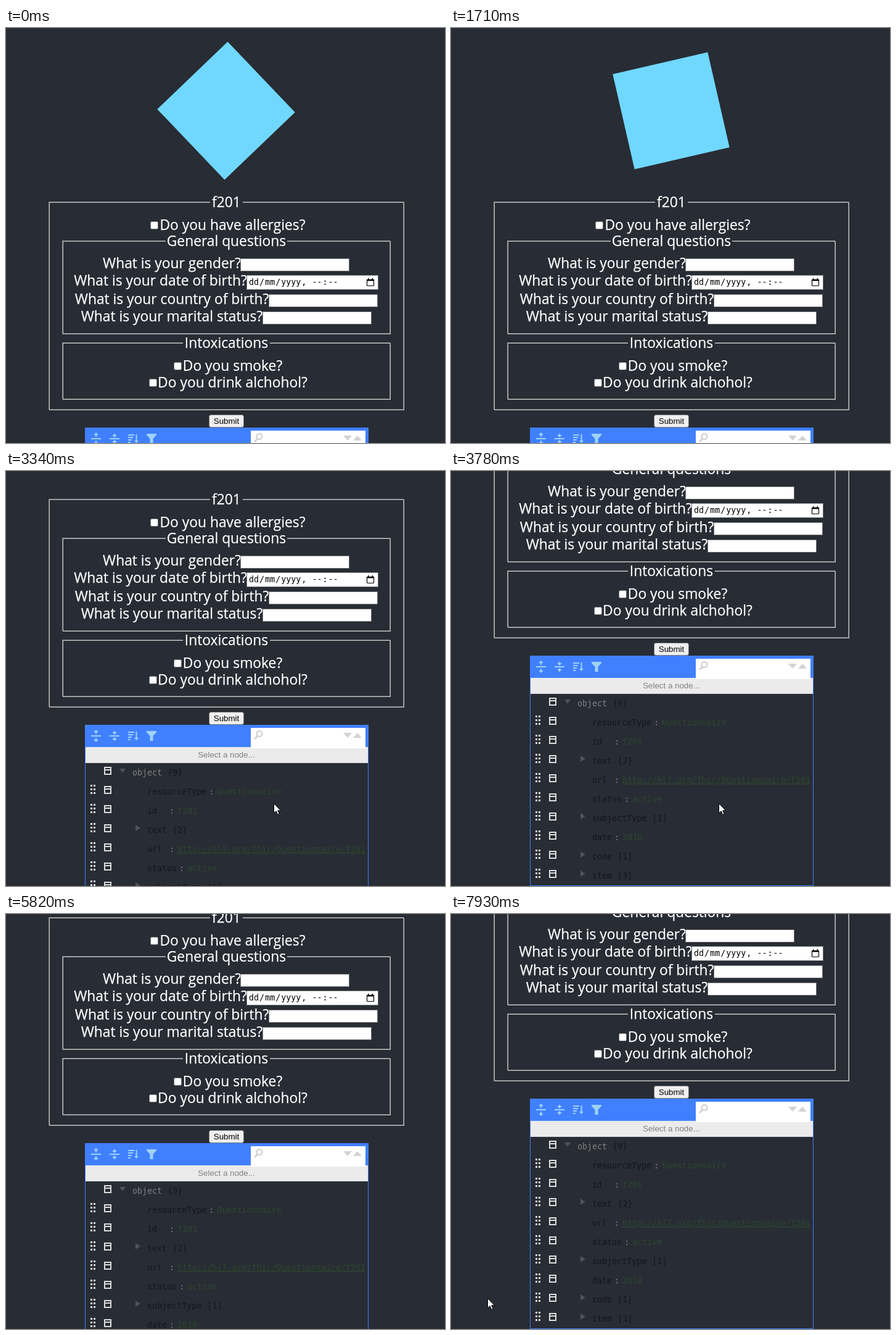
Write an HTML page that moves like this. It is 712x672 px and loops after 8 s.

```html
<!DOCTYPE html>
<html lang="en">
<head>
<meta charset="utf-8">
<title>Questionnaire form</title>
<style>
  html, body { margin: 0; width: 100%; height: 100%; overflow: hidden; background: #282c34; }
  svg { display: block; width: 712px; height: 672px; }
  text { white-space: pre; }
  .label {
    font: 22.8px "Open Sans", "Noto Sans", sans-serif; text-anchor: middle;
    fill: #fff; stroke: #fff; stroke-width: .25px;
  }
  .ui { font: 13.33px "Liberation Sans", Arial, sans-serif; text-anchor: middle; }
  .mono { font: 13.33px "DejaVu Sans Mono", monospace; }
</style>
</head>
<body>
<svg id="stage" viewBox="0 0 712 672"></svg>
<script>
const LOOP = 8000, MAX_SCROLL = 348;

// ---- drawing helpers ----
const rect = (x, y, w, h, fill, extra = '') =>
  `<rect x="${x}" y="${y}" width="${w}" height="${h}" fill="${fill}" ${extra}/>`;
const path = (d, fill, extra = '') => `<path d="${d}" fill="${fill}" ${extra}/>`;
const line = (d, color, w = 2) => path(d, 'none', `stroke="${color}" stroke-width="${w}"`);
const text = (cls, x, y, s, extra = '') => `<text class="${cls}" x="${x}" y="${y}" ${extra}>${s}</text>`;
const label = (x, y, s) => text('label', x, y, s);
const box = (x, y, w, h, fill = '#fff', r = 0) =>
  rect(x + .5, y + .5, w - 1, h - 1, fill, `rx="${r}" stroke="#767676"`);
const checkbox = (x, y) => box(x, y, 13, 13, '#fff', 2);

function fieldset(x, y, w, h, title, gap) {
  const edge = (d, c) => rect(x + d + .5, y + d + .5, w - 2, h - 2, 'none', `stroke="${c}"`);
  return edge(0, '#808080') + edge(1, '#c0c0c0') +
    rect(357.5 - gap / 2, y - 4, gap, 10, '#282c34') + label(357.5, y + 9, title);
}

// ---- questionnaire ----
function form() {
  return fieldset(69, 281, 577, 338, 'f201', 53) +
    checkbox(234, 313) + label(367.5, 327, 'Do you have allergies?') +
    fieldset(91, 344, 533, 152, 'General questions', 197) +
    label(269, 389, 'What is your gender?') + box(380, 373, 177, 21) +
    label(250.5, 417, 'What is your date of birth?') + box(390, 400, 214, 24) +
    text('mono', 393, 416, 'dd/mm/yyyy, --:--', 'dx="1 0 1 1 0 1 1 0 0 0 1 0 1 0 1 1 0"') +
    rect(585.5, 407.5, 11, 10, 'none', 'rx="1" stroke="#000" stroke-width="1.2"') +
    rect(585, 407, 12, 2.5, '#000') + rect(587, 405, 1.5, 2, '#000') + rect(593.5, 405, 1.5, 2, '#000') +
    label(269, 447, 'What is your country of birth?') + box(426, 431, 177, 21) +
    label(269, 475, 'What is your marital status?') + box(416, 459, 177, 21) +
    fieldset(91, 509, 533, 93, 'Intoxications', 141) +
    checkbox(272, 541) + label(367.5, 555, 'Do you smoke?') +
    checkbox(232, 568) + label(367.5, 582, 'Do you drink alchohol?') +
    box(329, 626, 57, 21, '#efefef', 3) + text('ui', 357.5, 641, 'Submit');
}

// ---- JSON tree ----
const CHAR = 8.03, BLUE = '#4080ff', ICON = '#a0d2f8', PALE = '#d3d3d3';
const rows = [
  ['object', '{9}'], ['resourceType', 'Questionnaire'], ['id', 'f201'], ['text', '{2}'],
  ['url', 'http://hl7.org/fhir/Questionnaire/f201'], ['status', 'active'],
  ['subjectType', '[1]'], ['date', '2010'], ['code', '[1]'], ['item', '[3]']
];

function row([key, value], i) {
  const base = 381 + 31 * i, mid = base - 8, x = i ? 229 : 205;
  const end = x + Math.max(4, key.length) * CHAR;
  const nested = /^[{[]/.test(value);
  const ink = '#14161a';
  let s = rect(160, mid - 5, 10, 11, 'none', 'stroke="#dcdcdc" stroke-width="2"') +
    rect(160, mid - 2, 10, 2, '#dcdcdc') +
    text('mono', x, base, key, `fill="${i ? ink : '#808080'}"`);
  for (let d = 0; i && d < 6; d++)
    s += rect(137 + d % 2 * 5, mid - 8 + (d >> 1) * 6, 3, 3, '#dcdcdc');
  if (nested) {
    s += text('mono', end + 9, base, value, `fill="${ink}"`) +
      path(i ? `M210 ${mid - 5}l8 5l-8 5z` : `M184 ${mid - 3}h10l-5 7z`, '#505358');
  } else {
    const link = key === 'url' ? 'text-decoration="underline"' : '';
    s += text('mono', end + 4, base, ':', 'fill="#808080"') +
      text('mono', end + 17, base, value, `fill="#2c482d" ${link}`);
  }
  return s;
}

function editor() {
  const icons =
    line('M138 317h16', ICON) +
    path('M146 307l4 4h-3v3h-2v-3h-3zM146 327l4-4h-3v-3h-2v3h-3z', ICON) +
    line('M168 317h16', ICON) +
    path('M176 315l4-4h-3v-2h-2v2h-3zM176 319l4 4h-3v2h-2v-2h-3z', ICON) +
    line('M198 311h10M198 315h8M198 319h6M198 323h4M211.500 310v11', ICON) +
    path('M208 320h7l-3.500 4z', ICON) +
    path('M228 309h16v2l-5.500 6v8h-5v-8l-5.500-6z', ICON);
  const search = rect(397, 304, 186, 33, '#fff') +
    `<circle cx="411" cy="313.500" r="4.500" fill="none" stroke="${PALE}" stroke-width="2.500"/>` +
    line('M408 317l-5 5', PALE, 3) +
    path('M547 312h14l-7 8zM563 320h14l-7-8z', PALE);
  return rect(128.5, 299.5, 459, 372, 'none', `stroke="${BLUE}"`) +
    rect(128, 299, 460, 36, BLUE) + icons +
    rect(129, 335, 458, 26, '#ebebeb') + rect(129, 360, 458, 1, '#d3d3d3') + search +
    text('ui', 357.5, 352, 'Select a node...', 'fill="#808080"') +
    rows.map(row).join('');
}

const stage = document.getElementById('stage');
stage.innerHTML =
  `<g id="page">${rect(278, 55, 158, 158, '#70d8ff', 'id="badge"')}${form()}` +
  `<g transform="translate(0 ${MAX_SCROLL})">${editor()}</g></g>` +
  path('M.5 .5v15.500l3.700-3.400l2.500 5.900l2.500-1l-2.500-5.700h4.800z', '#fff',
    'id="pointer" stroke="#000" stroke-width="1"');
const [page, badge, pointer] = ['page', 'badge', 'pointer'].map(id => document.getElementById(id));

// ---- motion ----
// Progress 0..1 in n hard steps: the first lands at t0, the last at t1.
const stepped = (t, t0, t1, n) =>
  t < t0 ? 0 : t >= t1 ? 1 : (Math.floor((t - t0) / (t1 - t0) * (n - 1)) + 1) / n;
const mix = (a, b, p) => a + (b - a) * p;
const smooth = p => p * p * (3 - 2 * p);

function scrollAt(t) {
  if (t < 3490) return 236 * smooth(stepped(t, 2590, 3340, 9));
  if (t < 5740) return mix(236, MAX_SCROLL, smooth(stepped(t, 3490, 3780, 5)));
  return MAX_SCROLL - 188 * Math.sin(Math.PI * stepped(t, 5740, 6320, 8));
}

function pointerAt(t) {
  if (t < 2590) return null;
  if (t < 4820) {
    const p = stepped(t, 3980, 4780, 19);
    const bend = (a, c, b) => mix(mix(a, c, p), mix(c, b, p), p);
    return [bend(434, 540, 651), bend(538, 306, 466)];
  }
  if (t < 4940) {
    const p = stepped(t, 4820, 4940, 4);
    return [mix(650, 708, p), mix(466, 460, p)];
  }
  if (t >= 6950 && t < 7190) {
    const p = stepped(t, 6950, 7190, 4);
    return [mix(588, 521, p), mix(530, 587, p)];
  }
  if (t >= 7580) {
    const p = stepped(t, 7580, 7930, 5);
    return [mix(544, 59, p), mix(568, 622, p)];
  }
  return null;
}

function draw(t) {
  page.setAttribute('transform', `translate(0 ${-Math.round(scrollAt(t))})`);
  badge.setAttribute('transform', `rotate(${(t - 2430) * .018} 357 134)`);
  const at = pointerAt(t);
  pointer.setAttribute('visibility', at ? 'visible' : 'hidden');
  if (at) pointer.setAttribute('transform', `translate(${at.map(Math.round).join(' ')})`);
}

const start = performance.now();
function tick() {
  draw((performance.now() - start) % LOOP);
  requestAnimationFrame(tick);
}
draw(0);
requestAnimationFrame(tick);
</script>
</body>
</html>
```
